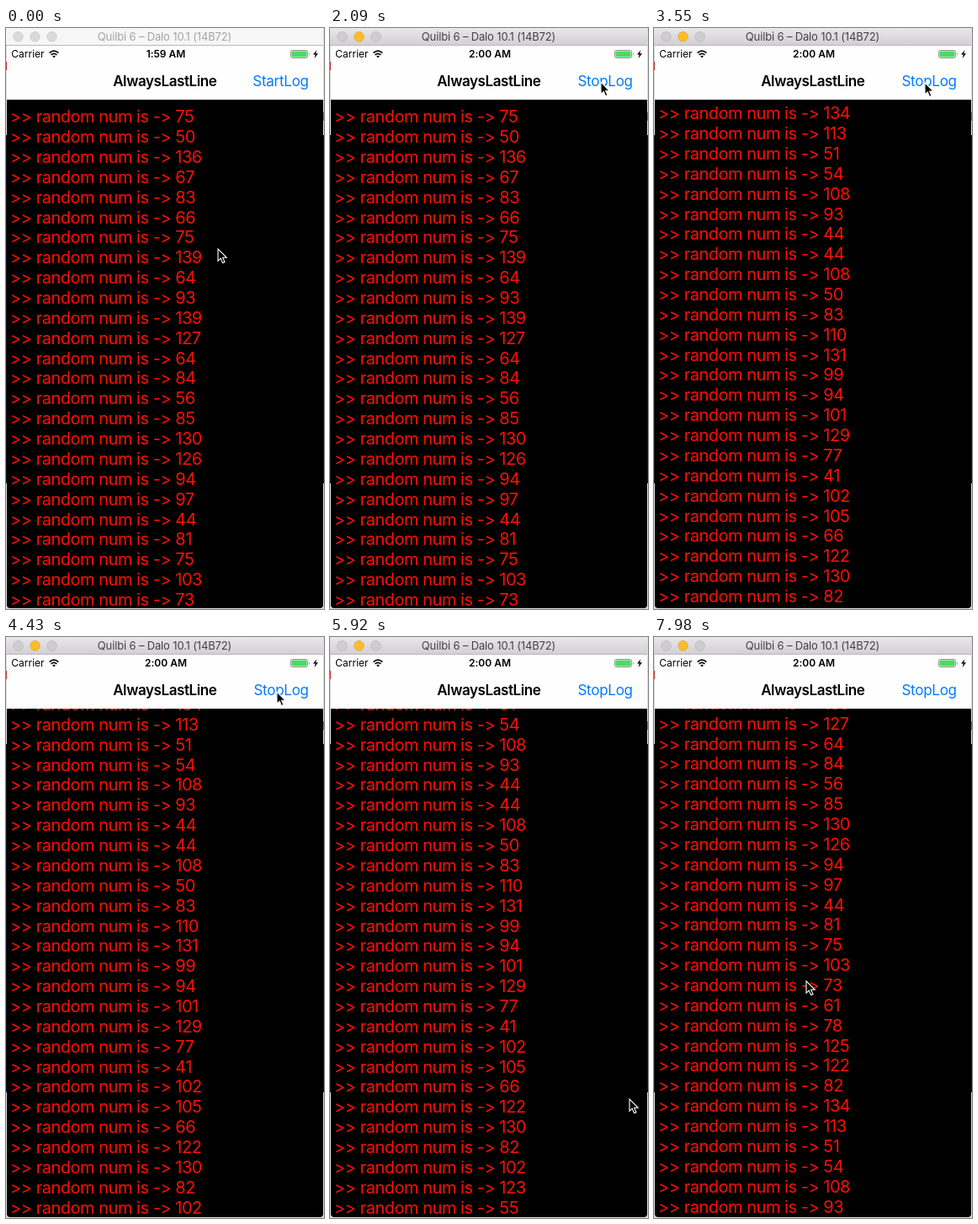
These frames come from a looping animation (378x689 px, 8000 ms). An HTML page:

```html
<!DOCTYPE html>
<html lang="en">
<head>
<meta charset="utf-8">
<title>AlwaysLastLine</title>
<style>
html, body { margin: 0; width: 100%; height: 100%; overflow: hidden; background: #fff; }
svg { display: block; width: 378px; height: 689px; }
text { font-family: Inter, Roboto, sans-serif; font-variant-ligatures: none; white-space: pre; }
#title { font-size: 13px; letter-spacing: -.15px; text-anchor: middle; }
.status { font-size: 12px; }
#clock { font-weight: 600; text-anchor: middle; }
#name { font-size: 17px; font-weight: 600; letter-spacing: -.42px; text-anchor: middle; }
#button { font-size: 17px; letter-spacing: -.25px; text-anchor: end; fill: #007aff; }
#log { font-size: 20px; letter-spacing: -.48px; fill: #fc1005; }
</style>
</head>
<body>
<svg viewBox="0 0 378 689">
  <defs>
    <linearGradient id="bar" x2="0" y2="1">
      <stop stop-color="#e9e7e9"/><stop offset="1" stop-color="#d1cfd1"/>
    </linearGradient>
    <clipPath id="view"><path d="M1 85H377V684q0 4 -4 4H5q-4 0 -4 -4z"/></clipPath>
  </defs>

  <!-- desktop slivers around the window -->
  <rect width="378" height="689" fill="#dcdcde"/>
  <rect y="127" width="378" height="413" fill="#18141a"/>
  <rect y="40" width="1" height="10" fill="#c33"/>
  <rect x="377" y="100" width="1" height="10" fill="#57c"/>

  <rect id="head" width="377" height="21"/>
  <rect y="20" width="377" height="1" fill="#b9b7b9"/>
  <g id="lights" stroke-width=".7">
    <circle cx="14.5" cy="10.3" r="5.8"/>
    <circle cx="34.5" cy="10.3" r="5.8"/>
    <circle cx="54.5" cy="10.3" r="5.8"/>
  </g>
  <text id="title" x="188.5" y="15">Quilbi 6 – Dalo 10.1 (14B72)</text>

  <rect x="1" y="21" width="376" height="64" fill="#fefefe"/>
  <text class="status" x="6.3" y="35.4">Carrier</text>
  <g fill="none" stroke="#000" stroke-width="1.7">
    <path d="M51.6 29.6q5.4 -4.8 10.8 0M53.6 31.9q3.4 -3 6.8 0"/>
  </g>
  <path d="M55.2 33.6q1.8 -1.5 3.6 0L57 35.6z"/>
  <text class="status" id="clock" x="190" y="35.4"></text>
  <rect x="338.5" y="26.5" width="20" height="9" rx="2" fill="#fff" stroke="#777" stroke-width=".8"/>
  <rect x="339.5" y="27.5" width="18" height="7" rx="1" fill="#4cd964"/>
  <path d="M360 29.3q1.8 1.7 0 3.4z" fill="#777"/>
  <path d="M369.3 26.3L365 31.6h2.7L366.6 35.9L371 30.3h-2.8z"/>
  <text id="name" x="188.8" y="69">AlwaysLastLine</text>
  <text id="button" x="359.8" y="69"></text>

  <g clip-path="url(#view)">
    <rect x="1" y="85" width="376" height="604"/>
    <g id="log"></g>
  </g>
  <path id="cursor" d="M0 0V14.2L3.2 11.2L5.6 16.6L8 15.6L5.6 10.3H10.2Z" stroke="#fff" stroke-width="1.1"/>
</svg>
<script>
const LOOP = 8000, STEP = 147.6, PITCH = 23.867;
const LOG_START = 2480, DRAG_START = 7000;
const nums = [
  75, 50, 136, 67, 83, 66, 75, 139, 64, 93, 139, 127, 64, 84, 56, 85, 130, 126, 94, 97,
  44, 81, 75, 103, 73, 61, 78, 125, 122, 82, 134, 113, 51, 54, 108, 93, 44, 44, 108, 50,
  83, 110, 131, 99, 94, 101, 129, 77, 41, 102, 105, 66, 122, 130, 82, 102, 123, 55, 96
];
const path = [
  [100, 252, 262], [1040, 322, 64], [4480, 322, 65], [5250, 356, 548],
  [5920, 356, 548], [6800, 178, 404], [7240, 178, 404], [7970, 181, 408]
];
const drag = [[DRAG_START, 812.8], [7232, 720], [7970, 265]];

const $ = id => document.getElementById(id);
const linear = u => u;
const smooth = u => u * u * (3 - 2 * u);
const clamp = u => Math.min(1, Math.max(0, u));

// Value at time t along keys of the form [time, ...values]
function along(keys, t, ease) {
  let i = 0;
  while (i < keys.length - 2 && t >= keys[i + 1][0]) i++;
  const [a, b] = [keys[i], keys[i + 1]];
  const u = ease(clamp((t - a[0]) / (b[0] - a[0])));
  return a.slice(1).map((v, j) => v + (b[j + 1] - v) * u);
}

// Offset that shows the last line after k + 1 new ones
const bottom = k => PITCH * (30 + k) + 1.3;

function scroll(t) {
  if (t < LOG_START) return 0;
  if (t >= DRAG_START) return along(drag, t, linear)[0];
  const k = Math.floor((t - LOG_START) / 1000);
  const from = k ? bottom(k - 1) : 0;
  const u = smooth(clamp((t - LOG_START - k * 1000) / 300));
  return from + (bottom(k) - from) * u;
}

const rows = nums.map((n, i) => {
  const row = document.createElementNS("http://www.w3.org/2000/svg", "text");
  row.setAttribute("x", 5);
  row.setAttribute("y", 112.2 + i * PITCH);
  row.textContent = ">> random num is -> " + n;
  $("log").append(row);
  return row;
});

function draw(time) {
  const t = Math.floor(time % LOOP / STEP) * STEP;
  const active = t >= 1170, pressed = t >= 1320 && t < 1470;

  $("head").setAttribute("fill", active ? "url(#bar)" : "#f6f6f6");
  $("title").setAttribute("fill", active ? "#444" : "#a4a4a4");
  [...$("lights").children].forEach((light, i) => {
    const lit = active && i === 1;
    light.setAttribute("fill", lit ? "#fdbc2e" : active ? "#cfcdcf" : "#dadada");
    light.setAttribute("stroke", lit ? "#e0a028" : active ? "#b6b4b6" : "#c8c8c8");
  });
  $("clock").textContent = active ? "2:00 AM" : "1:59 AM";
  $("button").textContent = t < 1470 ? "StartLog" : "StopLog";
  $("button").setAttribute("opacity", pressed ? .2 : 1);

  const count = t < LOG_START ? 54 : 55 + Math.floor((t - LOG_START) / 1000);
  rows.forEach((row, i) => row.setAttribute("visibility", i < count ? "visible" : "hidden"));
  $("log").setAttribute("transform", `translate(0 ${-scroll(t)})`);
  $("cursor").setAttribute("transform", `translate(${along(path, t, smooth)})`);
}

const start = performance.now();
function tick() {
  draw(performance.now() - start);
  requestAnimationFrame(tick);
}
tick();
</script>
</body>
</html>
```
